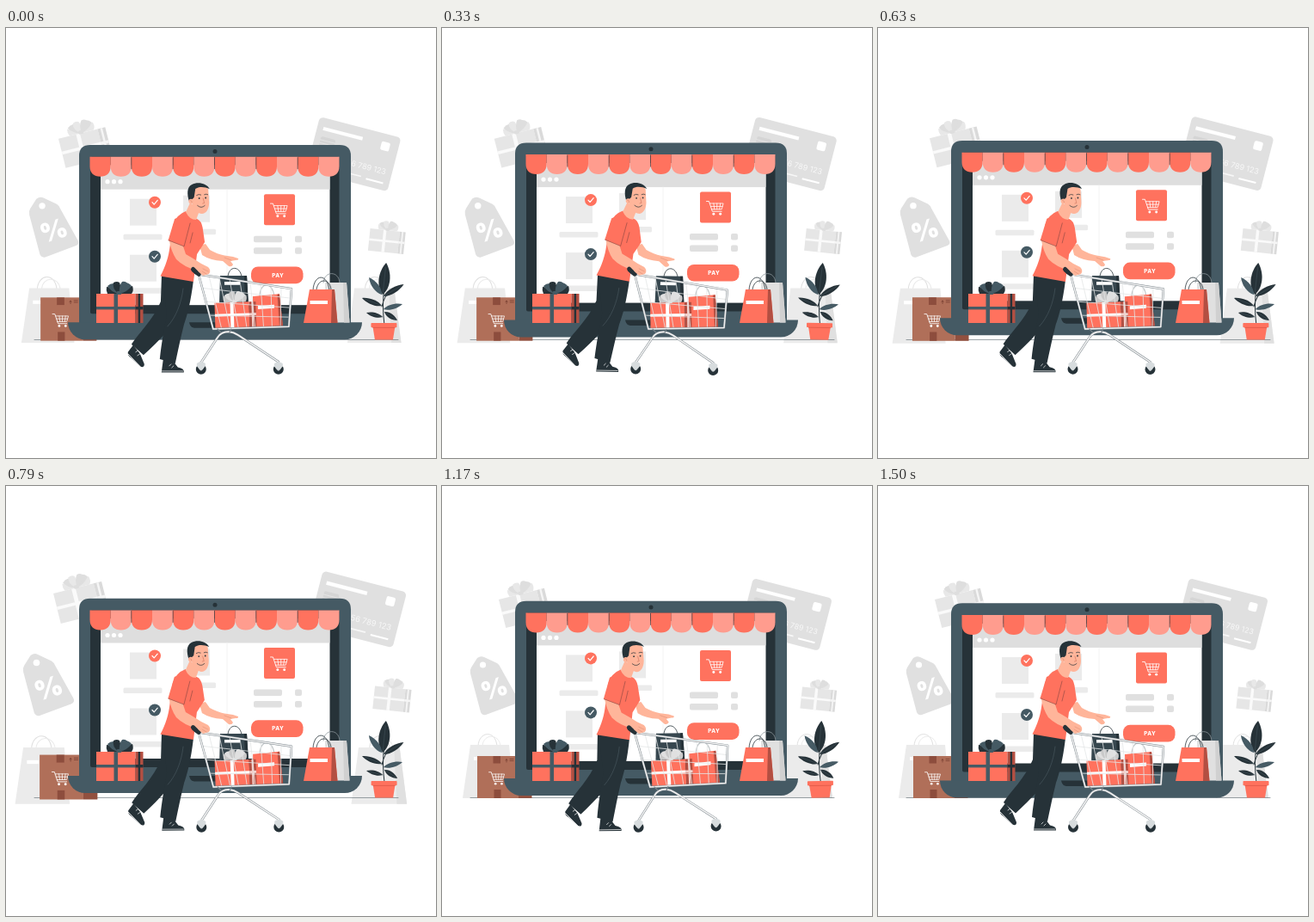
Recreate the animation shown at these times as an HTML page. Size 500 by 500 pixels, loop 1540 ms.

```html
<!DOCTYPE html>
<html lang="en">
<head>
<meta charset="utf-8">
<title>Online shopping</title>
<style>
html, body { margin: 0; width: 100%; height: 100%; overflow: hidden; background: #fff; }
svg { display: block; width: 100vw; height: 100vh; }
text { font-family: Inter, "Open Sans", sans-serif; }
</style>
</head>
<body>
<svg id="stage" viewBox="0 0 500 500" xmlns="http://www.w3.org/2000/svg"></svg>
<script>
const CORAL = '#ff725e', PINK = '#ff9c8e', RED = '#b34f42', SLATE = '#455a64',
      DARK = '#263238', SKIN = '#ffb59a', GRAY = '#e0e0e0', PALE = '#ebebeb';

const path = (d, fill, extra = '') => `<path d="${d}" fill="${fill}" ${extra}/>`;
const line = (d, color, w = 1, extra = '') =>
  `<path d="${d}" fill="none" stroke="${color}" stroke-width="${w}" stroke-linecap="round" stroke-linejoin="round" ${extra}/>`;
const rect = (x, y, w, h, fill, r = 0) =>
  `<rect x="${x}" y="${y}" width="${w}" height="${h}" rx="${r}" fill="${fill}"/>`;
const dot = (x, y, r, fill) => `<circle cx="${x}" cy="${y}" r="${r}" fill="${fill}"/>`;
const group = (body, attrs) => `<g ${attrs}>${body}</g>`;
const place = (body, x, y, rot = 0, s = 1) =>
  group(body, `transform="translate(${x} ${y}) rotate(${rot}) scale(${s})"`);

// A wrapped box: front 45 x 34, side 9 wide, bow on top
function gift(front, side, ribbon, sideRibbon, bow, fold) {
  return rect(0, 0, 45.5, 34, front) + rect(45.5, 0, 9, 34, side) +
    rect(20.5, 0, 4.5, 34, ribbon) + rect(0, 15, 45.5, 3.4, ribbon) +
    rect(45.5, 15, 9, 3.4, sideRibbon) + rect(48.7, 0, 2.4, 34, sideRibbon) +
    path('M26 0L13 0Q11-4 12-8Q20-8 26 0Z', fold) +
    path('M27 0L41 0Q44-4 42-9Q33-8 27 0Z', fold) +
    path('M26 0Q17-2 13-9Q16-12 20-12Q26-8 26 0Z', bow) +
    path('M27 0Q36-2 41-9Q38-13 33-13Q28-8 27 0Z', bow) +
    path('M26 0Q18-6 20-13Q24-15 27-13Q30-6 26 0Z', fold) +
    path('M27 0Q26-9 30-14Q34-15 36-12Q34-5 27 0Z', bow) +
    rect(23.5, -3, 6, 4, bow, 1.5);
}

function cartIcon(x, y, s) {
  return place(
    line('M-10.500-7.500H-7.500L-3.500 4.500H7.500', '#fff', .9) +
    line('M-6.500-5H9.500L7.500 2H-4.500M-5.500-1.500H8.500M-2-5L-1 2M2-5V2M6-5L5 2', '#fff', .8) +
    dot(-2, 7.5, 1.5, '#fff') + dot(6, 7.5, 1.5, '#fff'), x, y, 0, s);
}

function check(x, y, color) {
  return dot(x, y, 7, color) + line(`M${x - 3} ${y}l2.200 2.400 4-4.800`, '#fff', 1.2);
}

function card() {
  return rect(0, 0, 95, 63, GRAY, 4.5) + rect(7, 10, 46, 4, '#fff') +
    rect(75, 9, 10, 10, '#fff', 2) + rect(7, 21, 17, 11, '#d5d5d5', 2) +
    line('M7 25H24M7 28.500H24', '#e6e6e6', .8) +
    '<text x="88" y="45" font-size="8.800" fill="#f7f7f7" text-anchor="end">123 456 789 123</text>' +
    rect(44, 53, 18, 1.6, '#f7f7f7') + rect(68, 54, 20, 2, '#fff');
}

function tag() {
  return path('M41 200Q45 197 49 199L64 206Q67 208 68 211L88 247Q90 251 86 253L51 266Q47 267 45 263L33 218Q32 214 34 211Z', GRAY) +
    dot(47.5, 208, 3.6, '#fff') +
    '<text transform="translate(60.500 235.500) rotate(-18)" y="10.800" font-size="30" font-weight="900" fill="#fff" text-anchor="middle">%</text>';
}

function paleBags() {
  const handle = x => line(`M${x - 11} 302C${x - 10} 285 ${x + 9} 283 ${x + 11} 302`, GRAY, 1) +
    line(`M${x - 6} 302C${x - 5} 288 ${x + 13} 287 ${x + 15} 302`, PALE, 1);
  return handle(53) + path('M33 301H78L84 363H24Z', PALE) + rect(37, 315, 13, 4, '#fff') +
    handle(424) + path('M401 301H446L454 363H393Z', PALE) +
    path('M446 301L454 363H443L440 301Z', GRAY);
}

function parcel() {
  return rect(41, 314, 48, 49, '#b06f59') + rect(89, 314, 15.5, 49, '#91503f') +
    rect(59.5, 314, 8.5, 8.5, '#8d4d3d') + rect(60.5, 353, 8, 10, '#8d4d3d') +
    line('M75 321V318M74 319L75 317.500L76 319M79 317.500H83M79 319.500H83', '#7a4133', .8) +
    cartIcon(64, 339.5, .9);
}

function awning() {
  const w = 290 / 12;
  let s = '';
  for (let i = 0; i < 12; i++) {
    const x = 97.5 + i * w;
    s += path(`M${x} 150h${w}v11c0 8 -4.500 12 ${-w / 2} 12s${-w / 2} -4 ${-w / 2} -12Z`, i % 2 ? PINK : CORAL);
    if (i && i % 2 === 0) s += line(`M${x} 151v13`, DARK, .6);
  }
  return s;
}

function screen() {
  let s = rect(110, 160, 266.5, 162.5, '#fff') + rect(110, 160, 266.5, 28, '#dedede');
  for (const x of [118, 125.5, 133]) s += dot(x, 179, 2.6, '#fff');
  for (const [x, y] of [[144, 199], [144, 264], [206, 195]]) s += rect(x, y, 31, 31, PALE);
  for (const [x, y] of [[136.5, 240], [136.5, 302.5], [199, 234]]) s += rect(x, y, 45, 6.5, PALE, 1.5);
  s += line('M257 188V322', '#f0f0f0', .8) + check(173, 203, CORAL) + check(173, 266, SLATE);
  s += rect(300, 193.5, 36, 36, CORAL, 2) + cartIcon(317.8, 211.8, .98);
  for (const y of [242, 255.5]) s += rect(288, y, 33, 7.5, GRAY, 2) + rect(336, y, 8, 7.5, GRAY, 2);
  return s + rect(285, 277.8, 60.5, 19.7, CORAL, 8) +
    '<text x="316.200" y="290" font-size="6.300" font-weight="800" letter-spacing=".450" fill="#fff" text-anchor="middle">PAY</text>';
}

function laptop() {
  return path('M85 344V149Q85 136.300 98 136.300H388Q401 136.300 401 149V344Z', SLATE) +
    rect(98, 150, 289.5, 182.5, DARK, 2) + dot(243, 143.7, 2.5, DARK) + screen() + awning() +
    path('M72 342.500H414A20 20 0 0 1 394 362.500H92A20 20 0 0 1 72 342.500Z', SLATE) +
    path('M213 342.500H273C272 347 270 349 266 349H220C216 349 214 347 213 342.500Z', DARK);
}

function frontBags() {
  return line('M369 296C370 282 387 282 388 296', '#8d979c', .8) +
    path('M371 296H396L399.500 342.500H372Z', GRAY) + path('M396 296L399.500 342.500H393L392 296Z', '#d0d0d0') +
    line('M357 305C358 285 374 285 376 305M361 304C363 290 377 291 378 304', DARK, .8) +
    path('M353 304H382L385.500 343H346Z', CORAL) + path('M382 304L385.500 343H378L379 304Z', RED) +
    rect(353.5, 317, 20.5, 4, '#fff');
}

function goods() {
  return line('M258 289C259 276 272 276 274 289', DARK, .8) +
    path('M249 288H280L282 322H248Z', '#37474f') + path('M280 288L282 322H278L277 288Z', DARK) +
    rect(254, 295, 18, 3.6, '#fff') +
    line('M295 313C295 294 310 294 312 312', '#c4c9cb', 1.2) +
    path('M287 312L318 309L322 346L288 349Z', CORAL) + path('M318 309L322 346L318 347L315.500 309.500Z', RED) +
    path('M293 323L312 321.500V325.500L293 327Z', '#fff') +
    place(gift(CORAL, RED, '#fff', '#f3d0cb', GRAY, '#c9c9c9'), 242.5, 319.5, -2, .88);
}

function cart() {
  const tube = (d, w = 2.4) => line(d, '#78838a', w) + line(d, '#f0f0f0', w - .9);
  let wires = '';
  for (let i = 1; i < 9; i++) {
    const k = i / 9;
    wires += `M${224 + 108 * k} ${286.5 + 16.5 * k}L${241 + 88 * k} ${350 - 3 * k}`;
  }
  for (let i = 1; i < 4; i++) {
    const k = i / 4;
    wires += `M${224 + 17 * k} ${286.5 + 63.5 * k}L${332 - 3 * k} ${303 + 44 * k}`;
  }
  const wheel = x => dot(x, 396.7, 6, DARK) + dot(x, 396.7, 1.8, '#c7cdd0') +
    path(`M${x - 5} 393V390Q${x} 386 ${x + 5} 390V393L${x + 2} 397H${x - 2}Z`, '#d7dcde');
  return line(wires, '#e4e6e7', .8) +
    tube('M241 350L329 347L332 303L224 286.500Z') +
    tube('M227 389L246 360Q250 353 259 353Q265 353.500 270 357L317 388', 2.6) +
    line('M246 350L250 354M262 350L260 354', '#78838a', 1.2) +
    wheel(227) + wheel(317) + line('M218.500 281.500L224 286', DARK, 5.5);
}

function legs() {
  return path('M148 369L142 377Q141 381 146 384L156 393.500Q161 396 161 391L156 379Z', DARK) +
    line('M142 379L156 393.500', '#fff', .9) + line('M151 377L154 375M153 381L156 379', '#fff', .7) +
    path('M183 385L181 400.500H207Q208 396 200 394.500L195 388Z', DARK) +
    line('M181.500 399H206', '#fff', .7) + line('M192 391L190 393M195 393L193 395', '#fff', .7) +
    path('M181 287L180 318C171 340 154 355 146 368L160 380.500C178 364 194 348 205 325L210 295Z', DARK) +
    path('M182 287L218 293C215 318 211 334 207 345C203 361 200 376 197 390L179 385C181 366 184 350 187 333Z', DARK) +
    line('M206 303C204 320 198 336 188 347', '#53636b', .5);
}

function head() {
  return path('M209 214L214 203L225 212L221 223Q213 223 209 214Z', SKIN) +
    path('M217 186C223 182 233 182 235 188L236 203C236 211 232 216.500 227 216C221 215 216.500 209 216 202Z', SKIN) +
    path('M213 202C210 193 210 185 216 182C222 178.500 233 180 236.500 187C231 184.500 224 184 220 187L218.500 197L216.500 199L215.500 204Z', DARK) +
    dot(215, 201.5, 2.8, SKIN) + line('M214 200.500Q216.500 200 216 203', '#d98870', .6) +
    dot(224.5, 198, .9, DARK) + dot(232, 197.5, .9, DARK) +
    line('M221.500 194.500Q224 192.700 226.500 194M230.500 193.700Q232.500 192.500 234.500 193.700', DARK, .7) +
    line('M229 198L230.500 203.500L228.500 204', '#c9705a', .6) +
    line('M222.500 206.500Q227 210.500 231 206.500', DARK, .7);
}

function person() {
  const body = path('M209 213Q213 221 222 222Q227 224 228.500 232L231 249L222 263L218 295L179.500 288.500C186 276 189 266 190.500 254L194 229Q198 217 209 213Z', CORAL);
  const farArm = path('M225 253L232 251L237 258Q246 263 254 264.500L264 266L270 268Q271 270 267 270L261 271L264 275Q263 278 259 277L252 271Q237 270 228 264Z', SKIN) +
    line('M254 267L262 270', '#d98870', .5);
  const nearArm = path('M189.500 246L205 251L209 263Q218 268 227 274L235 278Q239 282 236 286L229 288L222 282Q207 278 198 269Q192 260 189.500 246Z', SKIN) +
    path('M196 222Q207 216 214 226L207 254L188.500 247Z', CORAL) +
    line('M214 227L207 254L189 247M217 238L214 250', '#6b3d3a', .5) +
    line('M229 280L235 283M228 283L233 286', '#d98870', .5);
  return legs() + farArm + body + head() + goods() + cart() + nearArm +
    line('M217.500 280.500L221 284', DARK, 5);
}

function leaf(x, y, tx, ty, w, color) {
  const dx = tx - x, dy = ty - y, len = Math.hypot(dx, dy), nx = -dy / len * w, ny = dx / len * w;
  const at = (k, n) => `${x + dx * k + nx * n} ${y + dy * k + ny * n}`;
  return path(`M${x} ${y}C${at(.25, 1)} ${at(.7, .9)} ${tx} ${ty}C${at(.7, -.9)} ${at(.25, -1)} ${x} ${y}`, color) +
    line(`M${x} ${y}L${at(.85, 0)}`, '#53656e', .35);
}

function plant() {
  return line('M440 345Q437 322 440 302M437 324Q440 312 446 306', DARK, 1) +
    leaf(438, 310, 442, 273, 9, DARK) + leaf(437, 310, 422, 290, 5, SLATE) +
    leaf(439, 312, 462.500, 298, 4.5, DARK) + leaf(437, 323, 414, 314, 4.2, DARK) +
    leaf(439, 327, 461, 321, 4, SLATE) + leaf(438, 336, 419, 331, 3.6, DARK) +
    leaf(440, 330, 455, 340, 4, DARK) +
    path('M426.500 347H452.500L450 362.500H429Z', CORAL) + rect(424.5, 343, 30, 5.2, CORAL, .8) +
    line('M427 348.400H452', '#d95444', .7);
}

const paleGift = gift('#e6e6e6', '#dadada', '#fafafa', '#f5f5f5', '#dedede', '#e8e8e8');
const scene = document.getElementById('stage');
scene.innerHTML =
  group(place(card(), 362, 107, 14.5) + place(paleGift, 66, 132, -14, 1) +
    place(paleGift, 419, 233.5, 6, .74) + tag() + paleBags(), 'id="back"') +
  line('M33 362.500H456', '#59676e', .6) +
  group(parcel(), 'id="parcel"') + group(laptop(), 'id="laptop"') +
  place(gift(CORAL, RED, SLATE, DARK, SLATE, DARK), 105, 309) +
  frontBags() + group(plant(), 'id="plant"') + group(person(), 'id="person"');

const LOOP = 1540, STEPS = 37;
const parts = {};
for (const id of ['back', 'parcel', 'laptop', 'plant', 'person']) parts[id] = document.getElementById(id);
const move = (id, value) => parts[id].setAttribute('transform', value);
const scaleAt = (s, x, y) => `translate(${x} ${y}) scale(${s}) translate(${-x} ${-y})`;

// Linear interpolation through [time, value] keys
function track(p, keys) {
  let i = 1;
  while (i < keys.length - 1 && p > keys[i][0]) i++;
  const [a, u] = keys[i - 1], [b, v] = keys[i];
  return u + (v - u) * (p - a) / (b - a);
}

const BEAT = [[0, 1], [.1, 1.1], [.3, 1], [.4, 1], [.5, 1.1], [.6, 1], [1, 1]];
const FLOAT = [[0, 0], [.5, -6], [1, 0]];
const SWAY = [[0, 0], [.25, 1], [.75, -1], [1, 0]];

function draw(now) {
  // Movement advances at 24 steps per second
  const step = Math.min(STEPS - 1, Math.floor((now % LOOP + 4.9) * 24 / 1000));
  const p = (step + 1) / STEPS;
  const beat = track(p, BEAT), sway = track(p, SWAY);
  move('back', scaleAt(beat, 250, 250));
  move('parcel', scaleAt(beat, 73, 338));
  move('laptop', `translate(0 ${track(p, FLOAT)})`);
  move('plant', `rotate(${sway} 439 318)`);
  move('person', `rotate(${sway} 237 291)`);
}

function tick(now) {
  draw(now);
  requestAnimationFrame(tick);
}
draw(0);
requestAnimationFrame(tick);
</script>
</body>
</html>
```
